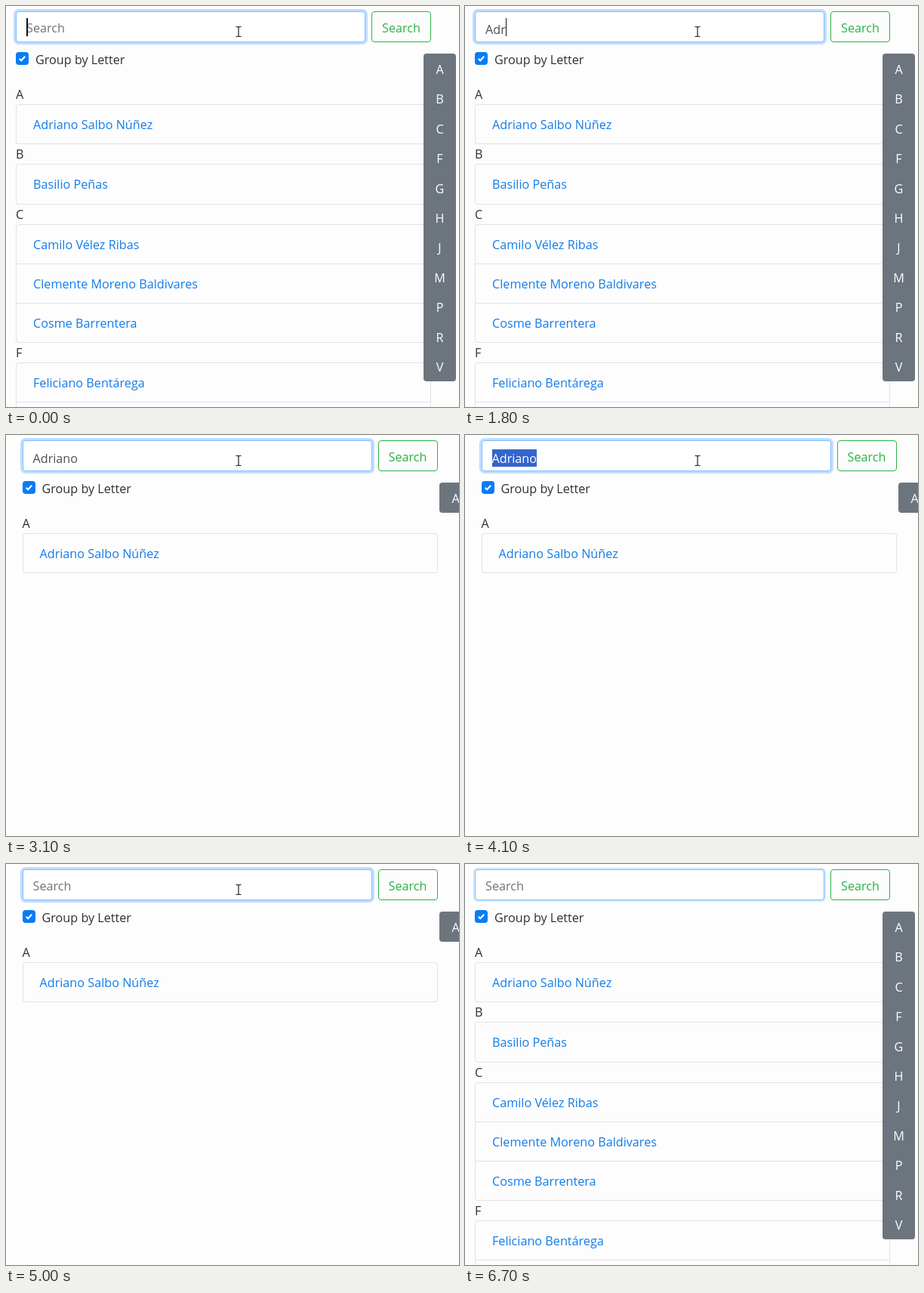
An HTML page for the animation above (6800 ms loop, 600 px wide and 531 px high).

```html
<!DOCTYPE html>
<html lang="en">
<head>
<meta charset="utf-8">
<title>Contact search</title>
<style>
html, body { margin: 0; width: 100%; height: 100%; overflow: hidden; background: #fefdfe; }
#stage {
  position: relative; width: 600px; height: 531px; overflow: hidden;
  background: #fefdfe; color: #2b3036;
  font: 16.2px "Open Sans", "Noto Sans", sans-serif;
}
#page, #page > *, #bar, #pointer { position: absolute; }
#page { left: 0; top: 0; width: 600px; height: 531px; }
#page.found { left: 8.5px; }
#field {
  left: 13px; top: 7px; width: 463px; height: 41px; box-sizing: border-box;
  border: 1px solid #80bdff; border-radius: 4px; background: #fff;
  box-shadow: 0 0 0 3px #bfdeff; line-height: 42px; color: #495057;
}
#field.blur { box-shadow: 0 0 0 2px #cfe6ff; }
#query, #hint { position: absolute; left: 13px; top: 0; white-space: pre; }
#hint { color: #6c757d; }
#text { display: inline-block; height: 23px; line-height: 24px; vertical-align: middle; }
#text.marked { background: #3465cc; color: #fff; }
#caret { position: absolute; left: 100%; top: 8px; width: 1.5px; height: 24px; background: #111; }
#button {
  left: 484px; top: 7px; width: 79px; height: 40.5px; box-sizing: border-box;
  border: 1px solid #28b446; border-radius: 4px;
  color: #28b446; line-height: 42px; text-align: center;
}
#check { left: 13px; top: 61px; }
#label { left: 39px; top: 58px; line-height: 26px; white-space: pre; }
#list { left: 13px; top: 104.3px; width: 550px; }
.head { height: 26px; line-height: 26px; }
.card { border: 1px solid #dfe2e6; border-top: 0; border-radius: 4px; }
.row {
  height: 50.15px; line-height: 50.15px; padding: 1px 0 0 22px;
  border-top: 1px solid #dfe2e6; color: #127de8; white-space: pre;
}
.row:first-child { border-radius: 4px 4px 0 0; }
#bar {
  left: 553px; top: 63px; width: 43px; padding-bottom: 1px;
  border-radius: 4px; background: #6c757d; color: #fff; text-align: center;
}
#bar.found { left: 574px; }
#bar div { height: 39.4px; line-height: 43px; }
#pointer { left: 303px; top: 26px; }
.found .extra { display: none; }
</style>
</head>
<body>
<div id="stage">
  <div id="page">
    <div id="field">
      <div id="hint">Search</div>
      <div id="query"><span id="text"></span><i id="caret"></i></div>
    </div>
    <div id="button">Search</div>
    <svg id="check" width="17" height="17" viewBox="0 0 17 17">
      <rect width="17" height="17" rx="4" fill="#087cf7"/>
      <path d="M4.7 8.7l2.5 2.5 5-5.4" fill="none" stroke="#fff" stroke-width="2"/>
    </svg>
    <div id="label">Group by Letter</div>
    <div id="list"></div>
  </div>
  <div id="bar"></div>
  <svg id="pointer" width="10" height="16" viewBox="0 0 10 16" fill="none" stroke="#222" stroke-width="1.2">
    <path d="M1.5 1.5H4L5 2.5 6 1.5H8.5M5 2.5V13.5M1.5 14.5H4L5 13.5 6 14.5H8.5"/>
  </svg>
</div>
<script>
const LOOP = 6800;
const WORD = "Adriano";
const GROUPS = {
  A: ["Adriano Salbo Núñez"],
  B: ["Basilio Peñas"],
  C: ["Camilo Vélez Ribas", "Clemente Moreno Baldivares", "Cosme Barrentera"],
  F: ["Feliciano Bentárega", ""]
};
const KEY_TIMES = [800, 1000, 1300, 2000, 2200, 2400, 2500];
const FOUND = [3100, 5100];
const MARKED = [4100, 4300];
const BLUR = 6700;
// Caret opacity, each value held until the next time
const CARET = [
  [0, 1], [400, 0], [800, 1], [3100, 0], [3600, 1], [4100, 0],
  [4300, 1], [4800, 0.5], [5000, 0], [5400, 1], [5900, 0]
];

const $ = id => document.getElementById(id);
const within = (t, [from, to]) => t >= from && t < to;

function add(parent, className, text = "") {
  const el = document.createElement("div");
  el.className = className;
  el.textContent = text;
  return parent.appendChild(el);
}

Object.entries(GROUPS).forEach(([letter, names], i) => {
  const group = add($("list"), i ? "extra" : "");
  add(group, "head", letter);
  const card = add(group, "card");
  names.forEach(name => add(card, "row", name));
});
[..."ABCFGHJMPRV"].forEach((letter, i) => add($("bar"), i ? "extra" : "", letter));

function render(t) {
  const typed = t < MARKED[1] ? KEY_TIMES.filter(k => t >= k).length : 0;
  const found = within(t, FOUND);
  $("text").textContent = WORD.slice(0, typed);
  $("text").classList.toggle("marked", within(t, MARKED));
  $("hint").style.opacity = typed ? 0 : 1;
  $("caret").style.opacity = CARET.filter(([start]) => t >= start).pop()[1];
  $("page").classList.toggle("found", found);
  $("bar").classList.toggle("found", found);
  $("field").classList.toggle("blur", t >= BLUR);
  $("pointer").style.opacity = t < FOUND[1] ? 1 : 0;
}

const start = performance.now();
function tick() {
  render((performance.now() - start) % LOOP);
  requestAnimationFrame(tick);
}
tick();
</script>
</body>
</html>
```
